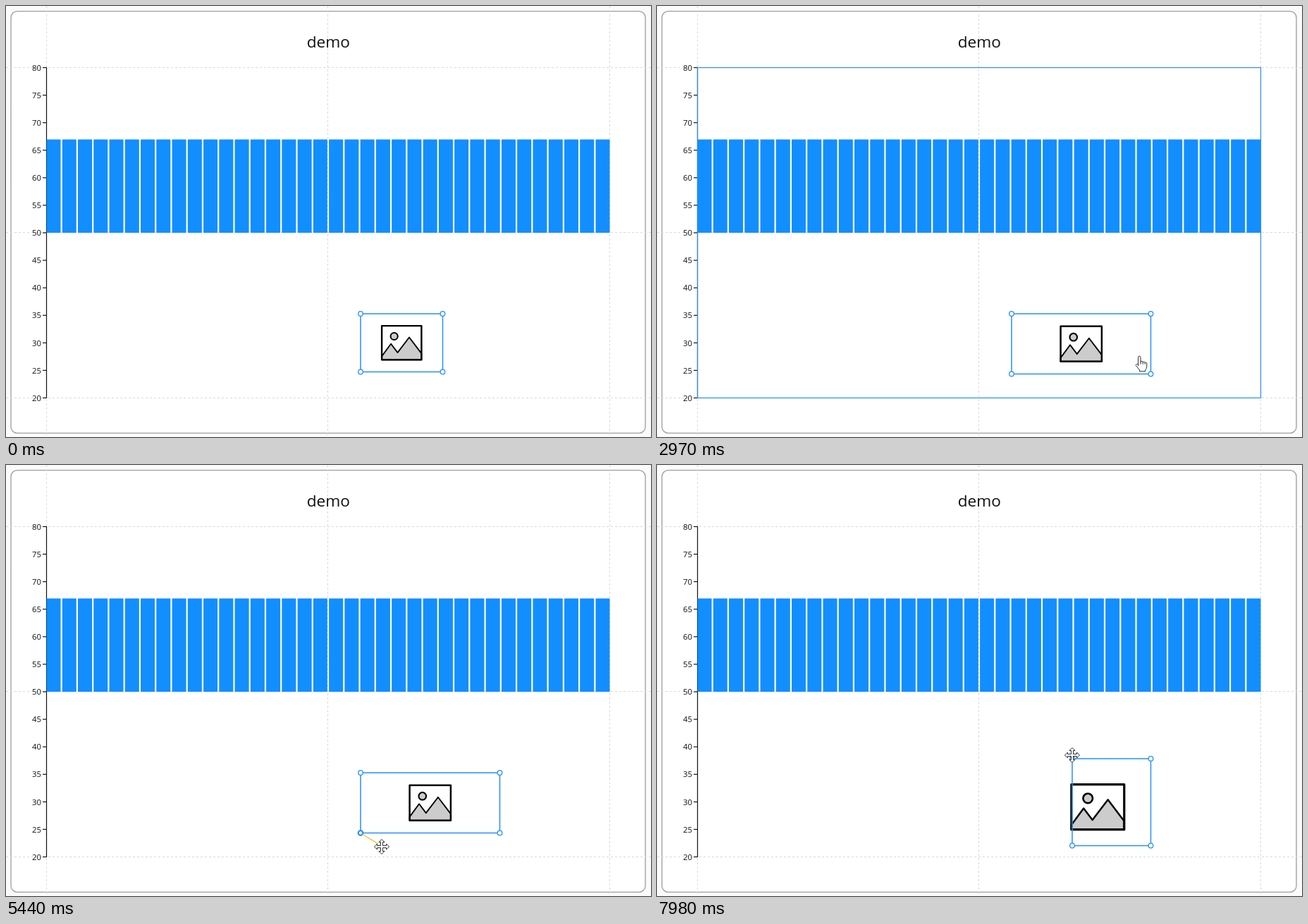
Recreate the animation shown at these times as an HTML page. Size 915 px wide and 612 px high, loop 8000 ms.

```html
<!DOCTYPE html>
<html lang="en">
<head>
<meta charset="utf-8">
<title>demo</title>
<style>
  html, body { margin: 0; width: 100%; height: 100%; overflow: hidden; background: #fbfbfb; }
  svg { display: block; width: 915px; height: 612px; font-family: "Open Sans", "Noto Sans", sans-serif; }
  .guide { stroke: #d9d9d9; stroke-dasharray: 3 3; }
  .axis { stroke: #111; stroke-width: 1.2; }
  .label { font-size: 11.3px; text-anchor: end; fill: #111; }
  .title { font-size: 22.6px; text-anchor: middle; fill: #111; }
  .select { fill: none; stroke: #2590f8; stroke-width: 1.5; }
  .handle { fill: #fff; stroke: #2590f8; stroke-width: 1.3; }
  .cursor { fill: #fff; stroke: #2b2b2b; stroke-linejoin: round; }
</style>
</head>
<body>
<svg viewBox="0 0 915 612">
  <rect x="7" y="7.5" width="900" height="599" rx="9" fill="#fff" stroke="#a9a9a9" stroke-width="1.5"/>
  <g id="chart"></g>
  <text class="title" x="457.3" y="59">demo</text>
  <rect id="outline" x="57.5" y="87.5" width="799" height="469" fill="none" stroke="#2a8cec" stroke-width="1.2"/>
  <g id="icon" stroke="#000" stroke-linejoin="round">
    <path d="M-35.3 24L-19 1.8L-7.2 17.4L13.5-9.7L35.3 19V30.2H-35.3Z" fill="#ccc" stroke-width="2.3"/>
    <circle cx="-13.3" cy="-11.6" r="6.4" fill="#ccc" stroke-width="2.5"/>
    <rect x="-35.3" y="-30.2" width="70.6" height="60.4" fill="none" stroke-width="3"/>
  </g>
  <rect id="select" class="select"/>
  <g id="handles"></g>
  <line id="trail" stroke="#e3bd1c" stroke-width="1.2"/>
  <g id="pointer">
    <path id="arrow" class="cursor" d="M0 0V16L4 12.5L6.5 18L9 17L6.5 11.5H11.5Z"/>
    <path id="hand" class="cursor" d="M-4.5 3V-9a1.7 1.7 0 0 1 3.4 0V-2a1.6 1.6 0 0 1 3.2 .3a1.6 1.6 0 0 1 3 .4a1.5 1.5 0 0 1 2.6 1V4q0 3-2 5V11H-2.5V9L-7.5 3a1.6 1.6 0 0 1 3-1.5ZM-1.1-2v3M2.1-1.7v2.7M5.1-1.3v2.3"/>
    <path id="move" class="cursor" d="M0-10.5L4-6.5H1.5V-1.5H6.5V-4L10.5 0L6.5 4V1.5H1.5V6.5H4L0 10.5L-4 6.5H-1.5V1.5H-6.5V4L-10.5 0L-6.5-4V-1.5H-1.5V-6.5H-4Z"/>
  </g>
</svg>
<script>
const LOOP = 8000, LAG = 70;
const area = { left: 57.5, top: 87.5, right: 856.5, bottom: 556.5 };
const $ = id => document.getElementById(id);

function set(el, attrs) {
  for (const key in attrs) el.setAttribute(key, attrs[key]);
  return el;
}
function add(parent, tag, attrs, text = '') {
  const el = set(document.createElementNS('http://www.w3.org/2000/svg', tag), attrs);
  el.textContent = text;
  return parent.appendChild(el);
}
const line = (cls, x1, y1, x2, y2) => add($('chart'), 'line', { class: cls, x1, y1, x2, y2 });
const show = (id, on) => set($(id), { visibility: on ? 'visible' : 'hidden' });

// Chart: guides and axis lie below the bars
const yOf = value => area.bottom - (value - 20) * (area.bottom - area.top) / 60;
for (const x of [area.left, 456.5, area.right]) line('guide', x, 0, x, 612);
for (const y of [area.top, 321.5, area.bottom]) line('guide', 0, y, 915, y);
line('axis', area.left, 87, area.left, 557);
for (let v = 20; v <= 80; v += 5) {
  line('axis', 52, yOf(v), area.left, yOf(v));
  add($('chart'), 'text', { class: 'label', x: 50, y: yOf(v) + 4.2 }, v);
}
const bars = 36, gap = 0.1;
const pitch = (area.right - area.left) / (bars - gap);
for (let i = 0; i < bars; i++) {
  add($('chart'), 'rect', {
    x: area.left + i * pitch, y: 189.5, width: pitch * (1 - gap), height: 132.5, fill: '#138eff'
  });
}
const handles = [0, 1, 2, 3].map(() => add($('handles'), 'circle', { class: 'handle', r: 3.3 }));

// Script of the pointer: glides, and drags that take one corner of the box along
const moves = [{
  start: 0, length: 0, pointer: { x: 884, y: 597 },
  box: { left: 503, top: 437, right: 619.5, bottom: 519.5 }
}];
const last = () => moves[moves.length - 1];

function glide(start, length, x, y) {
  moves.push({ start, length, pointer: { x, y }, box: last().box });
}
function drag(sideX, sideY, start, length, x, y, grip = 0) {
  const box = { ...last().box, [sideX]: x, [sideY]: y };
  moves.push({ start, length, pointer: { x, y: y + grip }, box, dragging: true });
}

glide(70, 620, 694, 458);
glide(1020, 120, 618, 525);
drag('right', 'bottom', 1560, 620, 642, 524.5);
drag('right', 'bottom', 2180, 80, 663.5, 526.5);
drag('right', 'bottom', 2370, 330, 700.5, 522.5);
glide(2760, 350, 680, 500);
glide(3390, 270, 557, 502);
glide(3670, 480, 503, 452);
glide(4220, 140, 503, 524);
// A pull: the pointer jumps ahead and the corner catches up
moves.push({ start: 5440, length: 0, pointer: { x: 533, y: 542 }, box: last().box, dragging: true, pulling: true });
drag('left', 'bottom', 5500, 70, 532.5, 540.5);
glide(5640, 350, 543, 462);
glide(6540, 360, 533, 437);
glide(7150, 250, 548, 452);
drag('left', 'top', 7870, 110, 589, 417, -5);

const smooth = k => k * k * (3 - 2 * k);
function blend(a, b, k) {
  const out = {};
  for (const key in a) out[key] = a[key] + (b[key] - a[key]) * k;
  return out;
}
function stateAt(t) {
  const i = Math.max(0, moves.findLastIndex(m => m.start <= t));
  const move = moves[i], from = moves[Math.max(0, i - 1)];
  const k = move.length ? smooth(Math.min(1, (t - move.start) / move.length)) : 1;
  return { move, pointer: blend(from.pointer, move.pointer, k), box: blend(from.box, move.box, k) };
}

// Resize cursor at the box's edge, hand elsewhere in the chart
function shapeOf({ move, pointer: { x, y }, box }) {
  if (move.dragging) return 'move';
  if (x > area.right || y > area.bottom) return 'arrow';
  const outside = Math.max(box.left - x, x - box.right, box.top - y, y - box.bottom);
  return Math.abs(outside) < 7 ? 'move' : 'hand';
}

function draw(t) {
  const state = stateAt(t);
  const { pointer, box: { left, top, right, bottom } } = state;
  const shape = t < 70 ? 'none' : shapeOf(state);

  set($('select'), { x: left, y: top, width: right - left, height: bottom - top });
  [[left, top], [right, top], [right, bottom], [left, bottom]]
    .forEach(([cx, cy], i) => set(handles[i], { cx, cy }));

  // The picture follows its box a little late
  const late = stateAt(t - LAG).box;
  const cx = (late.left + late.right) / 2, cy = (late.top + late.bottom) / 2;
  set($('icon'), { transform: `translate(${cx} ${cy}) scale(${(late.bottom - late.top) / 103.5})` });

  set($('pointer'), { transform: `translate(${pointer.x} ${pointer.y})` });
  for (const id of ['arrow', 'hand', 'move']) show(id, id === shape);
  show('outline', shape === 'hand');

  const pulling = Boolean(state.move.pulling);
  show('trail', pulling);
  set($('trail'), { x1: left, y1: bottom, x2: pointer.x - 5, y2: pointer.y - 4 });
  handles[3].style.strokeWidth = pulling ? 2.2 : '';
}

const begin = performance.now();
function tick() {
  draw((performance.now() - begin) % LOOP);
  requestAnimationFrame(tick);
}
tick();
</script>
</body>
</html>
```
